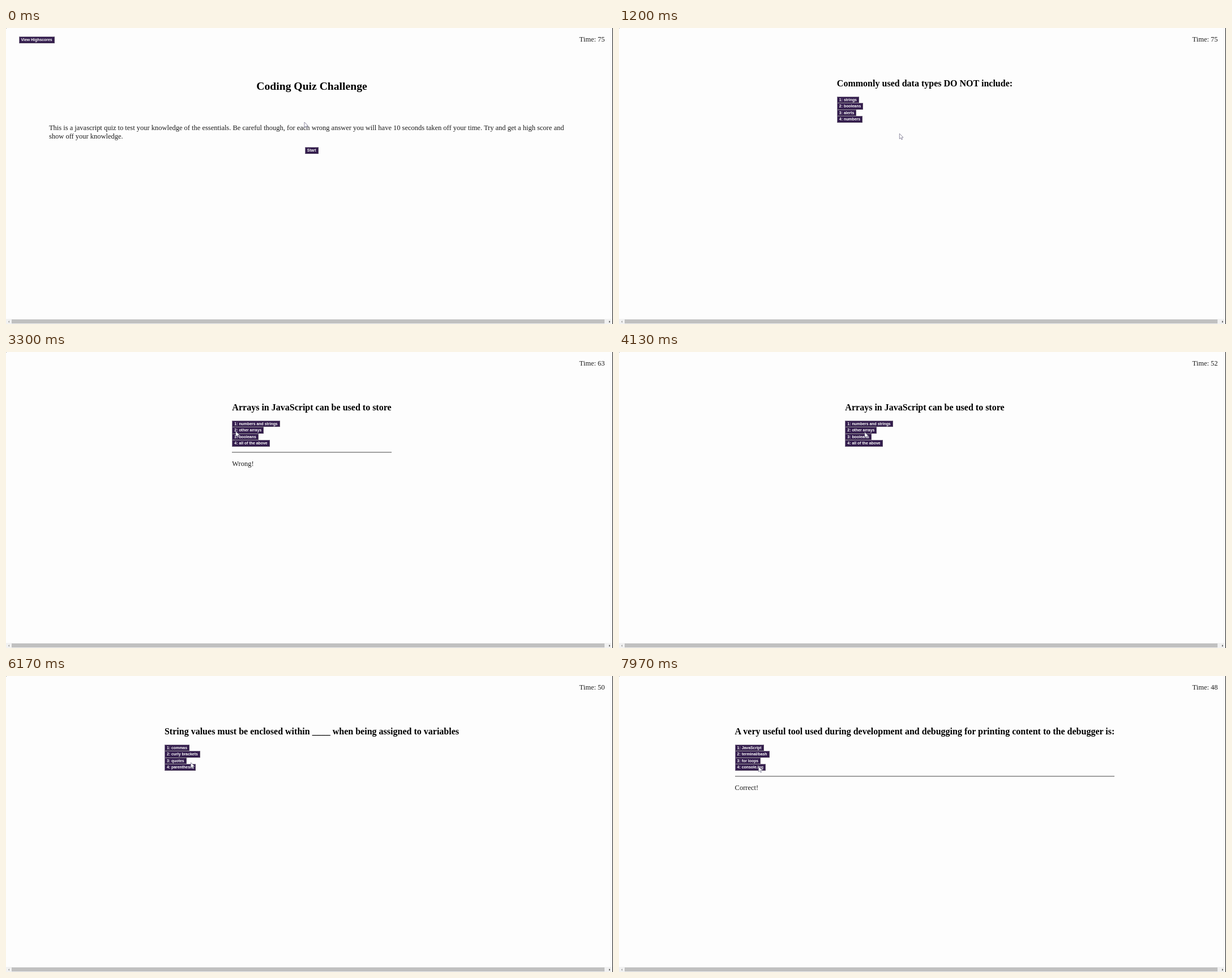
An HTML page that plays this animation: 1072 by 522 pixels, repeating every 8 s.

```html
<!DOCTYPE html>
<html lang="en">
<head>
<meta charset="utf-8">
<title>Coding Quiz Challenge</title>
<style>
  html, body { margin: 0; width: 100%; height: 100%; overflow: hidden; }
  body {
    position: relative;
    background: #fdfdfd;
    color: #1c1c1c;
    font: 12.48px/16px "Liberation Serif", "Times New Roman", serif;
    white-space: nowrap;
  }
  body > *, .quiz > * { position: absolute; }
  h1, h2, p, hr { margin: 0; }
  h1, h2 { color: #000; }
  [hidden] { display: none !important; }

  .btn {
    box-sizing: border-box;
    display: block;
    width: max-content;
    height: 11.66px;
    padding: 0 3px;
    border: 1px solid;
    border-color: #83798f #564a62 #564a62 #83798f;
    background: #331c4d;
    color: #fff;
    font: bold 6.92px/9.66px "Liberation Sans", Arial, sans-serif;
  }
  #timer { right: 14.5px; top: 12px; }
  #intro { inset: 0; }
  #intro > * { position: absolute; }
  #intro h1 { left: 0; width: 1080px; top: 90px; text-align: center; font-size: 19.65px; line-height: 24px; }
  #intro p { left: 76px; top: 169px; line-height: 14.5px; }
  #scores { left: 22.5px; top: 15px; }
  #start { left: 527.8px; top: 210.3px; }

  .quiz { left: 0; width: 1080px; top: 0; display: flex; justify-content: center; }
  .quiz .box { position: relative; height: 220px; width: max-content; }
  .box > * { position: absolute; left: 0; }
  .box h2 { position: relative; top: 87px; font-size: 16.03px; line-height: 21px; }
  .options { top: 120.5px; }
  .box hr { top: 176px; width: 100%; height: 2px; border: 0; background: linear-gradient(#858585 50%, #bdbdbd 50%); }
  .verdict { top: 189px; }

  #bar { left: 0; right: 0; bottom: 0; height: 9px; background: #f1f1f1; }
  #bar i { position: absolute; left: 9.5px; width: 1047.5px; top: 1px; height: 7px; background: #c0c0c0; }
  #bar b { position: absolute; top: 2.5px; border: 2px solid transparent; }
  #bar .prev { left: 2px; border-right-color: #999; }
  #bar .next { right: 3px; border-left-color: #444; }
  #edge { right: 0; top: 0; width: 1px; height: 100%; background: #151515; }
  #corner { left: 0; top: 0; width: 1px; height: 1px; background: #999; }
  #pointer { left: 0; top: 0; overflow: visible; }
</style>
</head>
<body>
  <div id="intro">
    <span id="scores" class="btn">View Highscores</span>
    <h1>Coding Quiz Challenge</h1>
    <p>This is a javascript quiz to test your knowledge of the essentials. Be careful though, for each wrong answer you will have 10 seconds taken off your time. Try and get a high score and<br>show off your knowledge.</p>
    <span id="start" class="btn">Start</span>
  </div>
  <div id="timer"></div>
  <div id="bar"><b class="prev"></b><i></i><b class="next"></b></div>
  <div id="edge"></div>
  <div id="corner"></div>
  <svg id="pointer" width="1" height="1">
    <circle id="ring" r="6" fill="none" stroke="#e23a48" stroke-width="1.1"/>
    <path d="M0 0V9.4L2.2 7.4 3.7 10.8 5.2 10.1 3.7 6.9H6.7Z" fill="#fff" stroke="#77738c" stroke-width=".8"/>
  </svg>

<script>
const LOOP = 8000, START = 740, VERDICT_TIME = 1300;

const questions = [
  { at: START, title: "Commonly used data types DO NOT include:",
    options: ["strings", "booleans", "alerts", "numbers"] },
  { at: 1950, verdict: "Wrong!", title: "The condition if an if/else statement is enclosed within ______",
    options: ["quotes", "curly brackets", "parenthesis", "square brackets"] },
  { at: 2760, verdict: "Wrong!", title: "Arrays in JavaScript can be used to store",
    options: ["numbers and strings", "other arrays", "booleans", "all of the above"] },
  { at: 4500, verdict: "Correct!", title: "String values must be enclosed within ____ when being assigned to variables",
    options: ["commas", "curly brackets", "quotes", "parenthesis"] },
  { at: 6740, verdict: "Correct!", title: "A very useful tool used during development and debugging for printing content to the debugger is:",
    options: ["JavaScript", "terminal/bash", "for loops", "console.log"] }
];

// Pointer stops: time, x, y
const path = [
  [0, 527, 166], [430, 543.5, 214], [820, 543.5, 214],
  [1750, 412, 138], [1980, 412, 138], [2200, 410, 150.5], [2300, 410, 150.5],
  [2640, 372, 138], [2850, 372, 138], [3700, 434, 141.5], [4150, 434, 141.5],
  [4400, 428, 159], [4580, 428, 159], [5250, 405, 170.5], [5400, 405, 170.5],
  [6450, 310, 149], [6860, 310, 149], [7800, 246.5, 159.5], [LOOP, 246.5, 159.5]
];

const $ = id => document.getElementById(id);
const intro = $("intro"), timer = $("timer"), pointer = $("pointer"), ring = $("ring");

for (const q of questions) {
  q.view = document.createElement("div");
  q.view.className = "quiz";
  q.view.innerHTML = `<div class="box"><h2>${q.title}</h2><div class="options">` +
    q.options.map((text, i) => `<span class="btn">${i + 1}: ${text}</span>`).join("") +
    `</div><div class="feedback" style="top:0;width:100%"><hr style="position:absolute">` +
    `<span class="verdict" style="position:absolute">${q.verdict || ""}</span></div></div>`;
  q.feedback = q.view.querySelector(".feedback");
  document.body.insertBefore(q.view, timer);
}

function pointerAt(t) {
  const i = path.findIndex(p => p[0] > t);
  const [t0, x0, y0] = path[i - 1], [t1, x1, y1] = path[i];
  const u = (t - t0) / (t1 - t0), k = u * u * (3 - 2 * u);
  return [x0 + (x1 - x0) * k, y0 + (y1 - y0) * k];
}

// Penalties only show up at the next whole second.
function secondsLeft(t) {
  const ticks = Math.max(0, Math.floor((t - START) / 1000));
  const lastTick = START + ticks * 1000;
  const wrong = questions.filter(q => q.verdict === "Wrong!" && q.at < lastTick && q.at <= t).length;
  return 75 - ticks - 10 * wrong;
}

function draw(now) {
  const t = now % LOOP;
  const current = questions.filter(q => q.at <= t).pop();
  intro.hidden = !!current;
  for (const q of questions) {
    q.view.hidden = q !== current;
    q.feedback.hidden = !q.verdict || t >= q.at + VERDICT_TIME;
  }
  timer.textContent = "Time: " + secondsLeft(t);
  const [x, y] = pointerAt(t);
  pointer.style.transform = `translate(${x}px, ${y}px)`;
  const pressed = questions.some(q => t > q.at - 90 && t < q.at + 90);
  ring.style.visibility = pressed ? "visible" : "hidden";
}

const begin = performance.now();
function frame() {
  draw(performance.now() - begin);
  requestAnimationFrame(frame);
}
frame();
</script>
</body>
</html>
```
